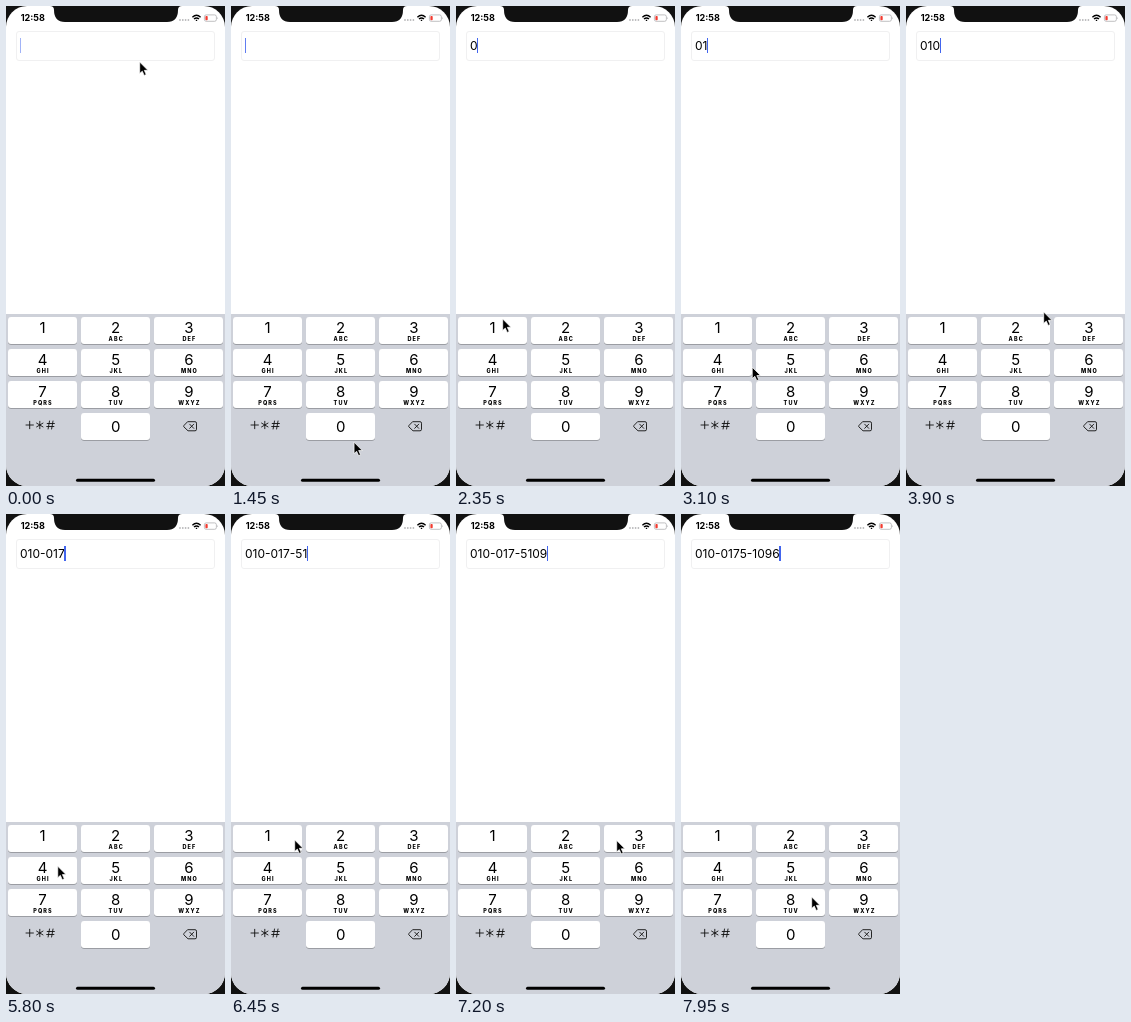
Animation, 219 px wide and 480 px high, one loop 8 s. Source, as an HTML page:

```html
<!DOCTYPE html>
<html lang="en">
<head>
<meta charset="utf-8">
<title>Phone number field</title>
<style>
  html, body { margin: 0; width: 100%; height: 100%; overflow: hidden; background: #111; }
  body { position: relative; font-family: Inter, "Liberation Sans", sans-serif; color: #000; }
  #screen {
    position: absolute; left: 0; top: 0; width: 219px; height: 480px;
    overflow: hidden; border-radius: 21px; background: #fff;
  }
  svg { position: absolute; left: 0; top: 0; }
  #field {
    position: absolute; left: 10px; top: 24.5px; width: 199px; height: 30px;
    box-sizing: border-box; border: 1px solid #f0f0f1; border-radius: 3px;
  }
  #line {
    position: absolute; left: 14px; top: 32px; height: 15px;
    display: flex; align-items: center; font-size: 12px; line-height: 15px; white-space: pre;
  }
  #caret { width: 1.3px; height: 15px; margin-left: -.4px; background: #4265ee; }
  #pad { position: absolute; left: 0; top: 307.6px; width: 219px; height: 173px; background: #ced1d9; }
  .key {
    position: absolute; width: 69px; height: 27.2px; border-radius: 3px;
    background: #fff; box-shadow: 0 .8px 0 #8b8d92; text-align: center;
  }
  .key.down { background: #afbccc; }
  .key b, .key i { position: absolute; left: 0; width: 100%; font-style: normal; }
  .key b { top: 1.5px; font-size: 15px; line-height: 18px; font-weight: 400; }
  .key i { top: 18.6px; font-size: 5.5px; line-height: 7px; font-weight: 800; letter-spacing: 1.1px; text-indent: 1.1px; }
  .key.zero b { top: 4.7px; }
  #time { position: absolute; left: 14.7px; top: 6px; font-size: 9.1px; line-height: 12px; font-weight: 700; }
</style>
</head>
<body>
<div id="screen">
  <div id="time">12:58</div>
  <div id="field"></div>
  <div id="line"><span id="text"></span><span id="caret"></span></div>
  <div id="pad"></div>
  <svg width="219" height="480" viewBox="0 0 219 480">
    <path d="M44 0Q48 0 48 4Q48 16 59 16H161Q172 16 172 4Q172 0 176 0Z" fill="#111"/>
    <path d="M174 14H183" stroke="#b9b9bb" stroke-width="1.8" stroke-linecap="round" stroke-dasharray="0 2.8"/>
    <path d="M186.4 11.2Q190.5 7.5 194.6 11.2M188 13Q190.5 10.8 193 13M189.8 14.4H191.2" fill="none" stroke="#000" stroke-width="1.4"/>
    <rect x="198.4" y="8.9" width="12" height="6.4" rx="1.8" fill="#fff" stroke="#a5a5a8" stroke-width=".7"/>
    <rect x="199.4" y="9.9" width="2.3" height="4.4" rx=".8" fill="#f23b30"/>
    <path d="M211.4 10.9Q212.6 12.1 211.4 13.3Z" fill="#a5a5a8"/>
    <g fill="none" stroke="#111" stroke-width=".9" stroke-linecap="round" stroke-linejoin="round">
      <path d="M20 419h7.4m-3.7 -3.7v7.4"/>
      <path d="M33.8 415.3v7.4m-3.2 -5.6l6.4 3.8m0 -3.8l-6.4 3.8"/>
      <path d="M43.5 415l-1.4 8m4.9 -8l-1.4 8m-4.4 -5.5h7.2m-7.7 3h7.2"/>
      <path d="M182 415.7h7q1.5 0 1.5 1.5v6.1q0 1.5 -1.5 1.5h-7l-4.2 -4q-.4 -.6 0 -1.1Z"/>
      <path d="M183.7 418.2l4 4.1m0 -4.1l-4 4.1"/>
    </g>
    <rect x="70" y="472.8" width="79" height="3" rx="1.5" fill="#000"/>
    <path id="pointer" d="M.7 0v11.4l2.6 -2.3l1.9 4.3l2 -.9l-1.9 -4.2h3.6Z" fill="#000" stroke="#fff" stroke-width=".7" stroke-linejoin="round"/>
  </svg>
</div>
<script>
  const LOOP = 8000, HOLD = 100, ECHO = 50;
  const DIGITS = "01001751096";

  // Keys in the order they are touched, and when
  const touched = [..."01012341234"].map(Number);
  const times = [1850, 2700, 3500, 4400, 4800, 5250, 5850, 6250, 6650, 7050, 7800];

  const $ = id => document.getElementById(id);
  const clamp = v => Math.min(1, Math.max(0, v));
  const text = $("text"), caret = $("caret"), pointer = $("pointer");

  // Grid cell of a digit: 1 to 9 in rows of three, 0 below the 8
  function cell(n) {
    const slot = n ? n - 1 : 10;
    return { col: slot % 3, row: Math.floor(slot / 3) };
  }

  const letters = ",,ABC,DEF,GHI,JKL,MNO,PQRS,TUV,WXYZ".split(",");
  const keys = letters.map((label, n) => {
    const { col, row } = cell(n);
    const key = document.createElement("div");
    key.className = n ? "key" : "key zero";
    key.style.left = 2 + 73.2 * col + "px";
    key.style.top = 3.7 + 32 * row + "px";
    key.innerHTML = `<b>${n}</b><i>${label}</i>`;
    $("pad").append(key);
    return key;
  });

  // The pointer rests on each touched key and passes a few places in between
  const stop = (t, x, y, rest = 0) => ({ t, x, y, rest });
  const stops = [
    stop(0, 133, 56), stop(150, 123, 370, 250), stop(550, 118, 484, 150),
    stop(1050, 123, 437, 350), stop(2300, 124, 419), stop(2350, 46, 313),
    stop(3900, 137, 306), stop(4100, 48, 326, 200), stop(7950, 130, 383, LOOP),
    ...touched.map((n, i) => {
      const { col, row } = cell(n);
      return stop(times[i], 48 + 57 * col, 326 + 31 * row - (row ? 4 : 0), HOLD);
    })
  ].sort((a, b) => a.t - b.t);

  function pointerAt(t) {
    const from = stops.findLast(s => s.t <= t);
    const to = stops[stops.indexOf(from) + 1] || from;
    const begin = from.t + from.rest;
    const u = to === from ? 0 : clamp((t - begin) / (to.t - begin));
    const e = u * u * (3 - 2 * u);
    return [from.x + (to.x - from.x) * e, from.y + (to.y - from.y) * e];
  }

  function format(d) {
    const mid = d.length > 10 ? 7 : 6;
    return [d.slice(0, 3), d.slice(3, mid), d.slice(mid)].filter(Boolean).join("-");
  }

  // Solid after each digit, then a soft blink once a second
  function caretAlpha(age) {
    if (age < 500) return 1;
    const s = (age - 500) % 1000;
    return s < 400 ? 1 - clamp(s / 150) : clamp((s - 400) / 150);
  }

  function draw(t) {
    const count = times.filter(p => p + ECHO <= t).length;
    const last = count ? times[count - 1] + ECHO : -575;
    text.textContent = format(DIGITS.slice(0, count));
    caret.style.opacity = caretAlpha(t - last);

    const held = touched[times.findIndex(p => t >= p && t < p + HOLD)];
    keys.forEach((key, n) => key.classList.toggle("down", n === held));

    pointer.setAttribute("transform", `translate(${pointerAt(t)})`);
  }

  const start = performance.now();
  function tick() {
    draw((performance.now() - start) % LOOP);
    requestAnimationFrame(tick);
  }
  tick();
</script>
</body>
</html>
```
